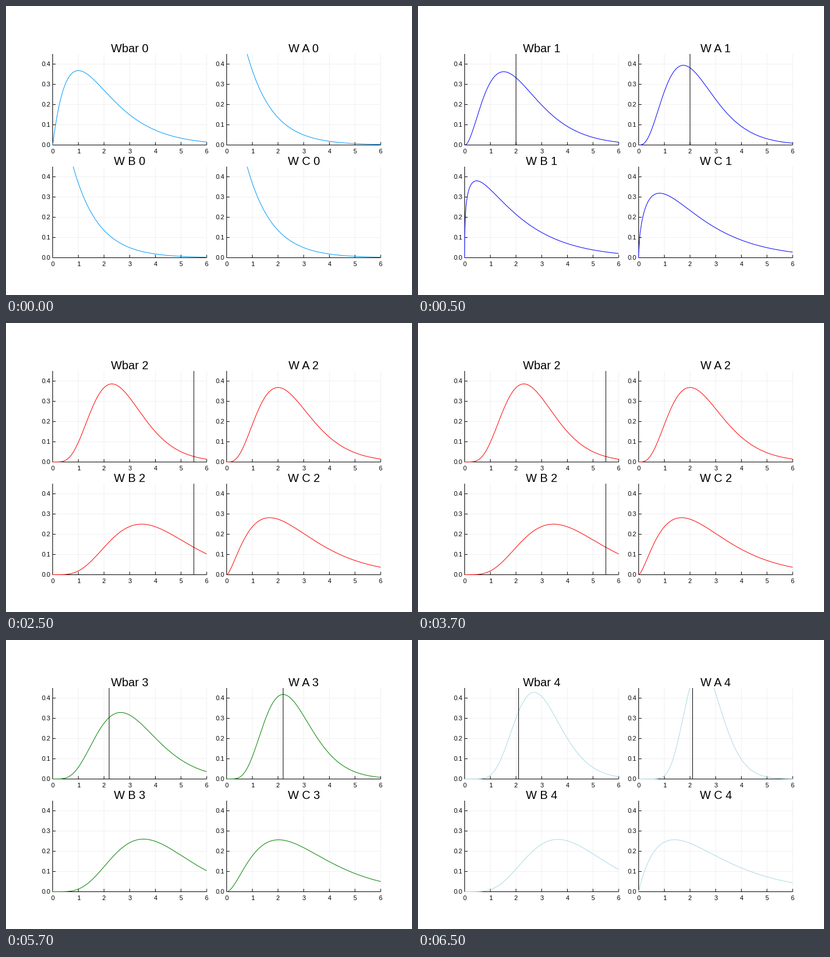
Recreate the animation shown at these times as a matplotlib script. Size 700 by 500 pixels, loop 8 s.

```python
import math

import matplotlib.pyplot as plt
import numpy as np
from matplotlib.animation import FuncAnimation
from matplotlib.patches import Rectangle

WIDTH, HEIGHT, DPI = 700, 500, 100
PX = 72 / DPI                      # points per pixel
X_UNIT, Y_UNIT = 44.25, 350        # pixels per data unit
X_MAX, Y_MAX = 6, 0.45

NAMES = ["Wbar", "W A", "W B", "W C"]
ORIGINS = [(80.5, 240.5), (380.5, 240.5), (80.5, 435.5), (380.5, 435.5)]
COLORS = ["#009afa", "blue", "red", "green", "lightblue"]

# Gamma (shape, scale) of each panel at each step
GAMMAS = [
    [(2, 1), (1, 1), (1, 1), (1, 1)],
    [(3.06, 0.737), (4.11, 0.559), (1.309, 1.5), (1.56, 1.455)],
    [(6.13, 0.449), (4.57, 0.56), (5.87, 0.711), (2.55, 1.078)],
    [(5.93, 0.537), (6.47, 0.402), (6.48, 0.6455), (2.85, 1.093)],
    [(9.58, 0.3148), (12.83, 0.2053), (6.7, 0.637), (1.95, 1.463)],
]
# Observed value and the panels that show it
OBSERVED = [(0, ()), (2, (0, 1)), (5.5, (0, 2)), (2.2, (0, 1)), (2.1, (0, 1))]

xs = np.linspace(0, X_MAX, 400) ** 2 / X_MAX

fig = plt.figure(figsize=(WIDTH / DPI, HEIGHT / DPI), dpi=DPI, facecolor="white")
ax = fig.add_axes([0, 0, 1, 1])
ax.set(xlim=(0, WIDTH), ylim=(HEIGHT, 0))
ax.axis("off")


def line(x, y, color="black", width=1.0, **kw):
    return ax.plot(x, y, color=color, lw=width * PX, snap=False,
                   solid_capstyle="butt", **kw)[0]


def label(x, y, text, size, ha="center"):
    return ax.text(x, y, text, fontsize=size * PX, family="Liberation Sans",
                   ha=ha, va="baseline", color="black")


def gamma_pdf(x, shape, scale):
    norm = math.gamma(shape) * scale ** shape
    return x ** (shape - 1) * np.exp(-x / scale) / norm


class Panel:
    def __init__(self, name, origin):
        self.name = name
        self.x0, self.y0 = x0, y0 = origin
        right, top = x0 + X_MAX * X_UNIT, y0 - Y_MAX * Y_UNIT
        for i in range(X_MAX + 1):
            x = x0 + i * X_UNIT
            line([x, x], [y0, top], "#f0f0f0", zorder=1)
            line([x, x], [y0, y0 - 5], zorder=2)
            label(x, y0 + 14.5, str(i), 11)
        for i in range(5):
            y = y0 - i * 0.1 * Y_UNIT
            line([x0, right], [y, y], "#f0f0f0", zorder=1)
            line([x0, x0 + 5], [y, y], zorder=2)
            label(x0 - 3.5, y + 3.5, f"{i / 10:.1f}", 11, "right")
        line([x0, x0], [y0 + 0.5, top], zorder=2)
        line([x0 - 0.5, right], [y0, y0], zorder=2)

        self.title = label((x0 + right) / 2, top - 3, "", 20)
        self.curve = line([], [], zorder=3)
        self.marker = line([], [], zorder=4)
        clip = Rectangle((x0 - 0.5, top), right - x0 + 0.5, y0 - top + 0.5,
                         transform=ax.transData)
        self.curve.set_clip_path(clip)

    def show(self, step, index):
        self.title.set_text(f"{self.name} {step}")
        self.curve.set_data(self.x0 + xs * X_UNIT,
                            self.y0 - gamma_pdf(xs, *GAMMAS[step][index]) * Y_UNIT)
        self.curve.set_color(COLORS[step])
        value, shown_in = OBSERVED[step]
        x = self.x0 + value * X_UNIT
        self.marker.set_data([x, x], [self.y0, self.y0 - Y_MAX * Y_UNIT])
        self.marker.set_visible(index in shown_in)


panels = [Panel(name, origin) for name, origin in zip(NAMES, ORIGINS)]


def update(frame):
    step = (frame + 3) // 4
    for index, panel in enumerate(panels):
        panel.show(step, index)
    return []


anim = FuncAnimation(fig, update, frames=16, interval=500, repeat=True,
                     repeat_delay=0, init_func=lambda: update(0))
plt.show()
```
